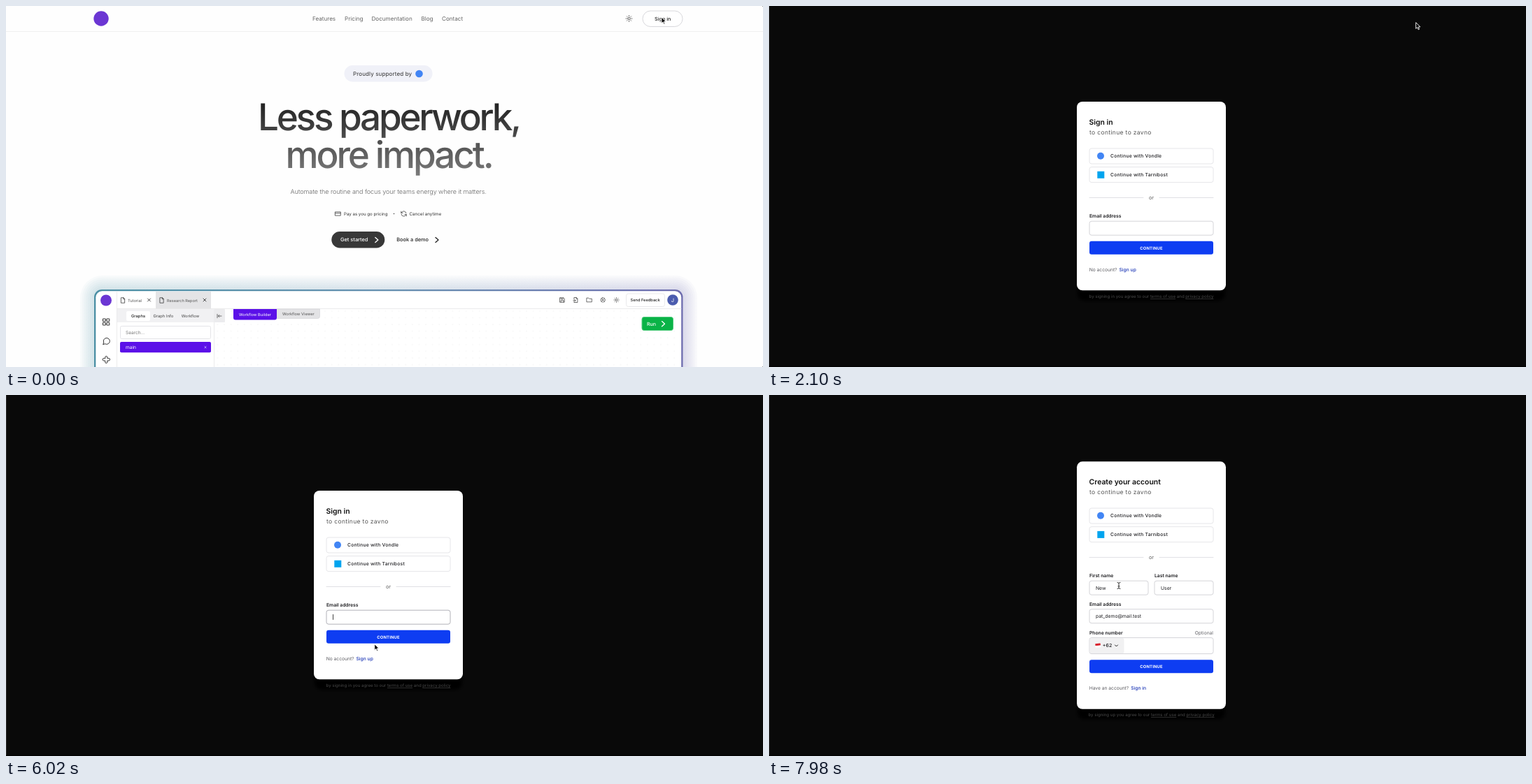
Animation, 1082 px wide and 517 px high, one loop 8 s. Source, as an HTML page:

```html
<!DOCTYPE html>
<html lang="en">
<head>
<meta charset="utf-8">
<title>Sign-in walkthrough</title>
<style>
  html, body { margin: 0; width: 100%; height: 100%; overflow: hidden; background: #fefefe; }
  svg { display: block; width: 100vw; height: 100vh; }
  text { font-family: Inter, Arial, sans-serif; text-rendering: geometricPrecision; white-space: pre; }
  .u { text-decoration: underline; }
  .m { font-weight: 500; }
  .b { font-weight: 600; }
  .x { font-weight: 700; }
  .c { text-anchor: middle; }
  .e { text-anchor: end; }
</style>
</head>
<body>
<svg id="stage" viewBox="0 0 1082 517" preserveAspectRatio="none"></svg>
<script>
const STEP = 70, LOOP = 8000;

// ---- drawing helpers
const text = (x, y, size, str, fill = '#222', cls = '', more = '') =>
  `<text x="${x}" y="${y}" font-size="${size}" fill="${fill}" class="${cls}" ${more}>${str}</text>`;
const rect = (x, y, w, h, fill, r = 0, stroke = 'none', more = '') =>
  `<rect x="${x}" y="${y}" width="${w}" height="${h}" rx="${r}" fill="${fill}" stroke="${stroke}" ${more}/>`;
const disc = (x, y, r, fill) => `<circle cx="${x}" cy="${y}" r="${r}" fill="${fill}"/>`;
const line = (d, stroke, width = 1) =>
  `<path d="${d}" fill="none" stroke="${stroke}" stroke-width="${width}" stroke-linecap="round" stroke-linejoin="round"/>`;
// icons live on a 24-unit grid centred on (x, y)
const icon = (x, y, size, d, stroke = '#333', width = 2) =>
  `<g transform="translate(${x} ${y}) scale(${size / 24}) translate(-12 -12)">${line(d, stroke, width)}</g>`;
const chevron = (x, y, color) => line(`M${x - 2} ${y - 3.6}l4 3.6l-4 3.6`, color, 1.3);
const cross = (x, y, r, color) =>
  line(`M${x - r} ${y - r}l${2 * r} ${2 * r}m0 ${-2 * r}l${-2 * r} ${2 * r}`, color, 0.8);

const SUN = 'M8 12a4 4 0 1 0 8 0a4 4 0 1 0-8 0M12 2v2M12 20v2M2 12h2M20 12h2M5 5l1.4 1.4M17.6 17.6L19 19M5 19l1.4-1.4M17.6 6.4L19 5';
const FILE = 'M14 2H5v20h14V7zM14 2v5h5';
const SAVE = 'M3 3h14l4 4v14H3zM7 3v5h8V3M7 21v-8h10v8';
const EXPORT = 'M5 9V2h9l5 5v15H5v-4M14 2v5h5M2 14h9M8 11l3 3l-3 3';
const FOLDER = 'M2 4h7l3 3h10v13H2z';
const GEAR = 'M12 2l3 3h4v4l3 3l-3 3v4h-4l-3 3l-3-3H5v-4l-3-3l3-3V5h4zM9 12a3 3 0 1 0 6 0a3 3 0 1 0-6 0';
const TILES = 'M3 3h7v7H3zM14 3h7v7h-7zM3 14h7v7H3zM14 14h7v7h-7z';
const CHAT = 'M3 21l2-5a9 9 0 1 1 4 4z';
const PUZZLE = 'M9 8V5a3 3 0 0 1 6 0v3h4a3 3 0 0 1 0 7h-4v4a3 3 0 0 1-6 0v-4H5a3 3 0 0 1 0-7z';
const PAYCARD = 'M2 5h20v14H2zM2 10h20';
const CYCLE = 'M21 10a9 9 0 0 0-16-4L2 9M2 3v6h6M3 14a9 9 0 0 0 16 4l3-3M22 21v-6h-6';
const COLLAPSE = 'M21 12H7M12 7l-5 5l5 5M3 4v16';

const PURPLE = '#6b36d3', VIVID = '#5b10e8', BLUE = '#0e3df2';

// ---- landing page
function glow() {
  let out = '';
  for (let i = 0; i < 7; i++) {
    const d = 20 - i * 2.8;
    out += rect(126 - d, 406 - d, 842 + 2 * d, 260, 'url(#edge)', 12 + d, 'none', 'opacity=".036"');
  }
  return out;
}

const preview = () => glow() +
  rect(126, 406, 841.5, 200, 'url(#edge)', 11) +
  rect(128.3, 408.3, 836.9, 200, '#fff', 9) +
  rect(298, 434, 667, 90, 'url(#dots)') +
  disc(143, 421.5, 8, PURPLE) +
  rect(214, 409, 79, 24.5, '#e4e4e6') +
  rect(159, 434, 154, 19, '#f1f1f3') + rect(297, 434, 16, 19, '#ececee', 2) +
  line('M158.500 409V517M297.500 453V517M159 433.500H965', '#e6e6e8', 0.8) +
  icon(167, 421.5, 9, FILE) + text(174, 423.7, 5.7, 'Tutorial', '#555') + cross(204.5, 421, 2, '#222') +
  icon(222.5, 421.5, 9, FILE) + text(230, 423.7, 5.6, 'Research Report', '#555') + cross(284, 421, 2, '#222') +
  [SAVE, EXPORT, FOLDER, GEAR, SUN].map((d, i) => icon(795 + i * 19.4, 421, 8.5, d)).join('') +
  rect(886.5, 412, 55, 18.5, '#fff', 3, '#e4e4e6', 'stroke-width=".8"') +
  text(892.5, 423.2, 5.7, 'Send Feedback', '#222', 'm') +
  disc(953, 421, 7.8, '#4b5cae') + text(953, 423.8, 7.5, 'J', '#fff', 'c') +
  rect(172, 437, 34, 14, '#fff', 2) + text(179, 446.1, 5.8, 'Graphs', '#222', 'm') +
  text(210.5, 446.1, 5.8, 'Graph Info', '#444') + text(250.7, 446.1, 5.7, 'Workflow', '#444') +
  icon(305, 444, 8, COLLAPSE) +
  rect(163.5, 458.5, 129, 18, '#fff', 2, '#dedee2', 'stroke-width=".8"') + text(171, 469.8, 6.5, 'Search...', '#777') +
  rect(163, 481, 130, 15.3, VIVID, 2) + text(171, 491, 6.6, 'main', '#fff') + cross(285, 488.7, 1.1, '#d9c9ff') +
  icon(143.3, 452.5, 12, TILES) + icon(143.3, 480, 12, CHAT) + icon(143.3, 506.5, 12, PUZZLE) +
  `<path d="M387.500 434h61v10.500a3 3 0 0 1-3 3h-58z" fill="#e3e3e5" stroke="#d2d2d5" stroke-width=".6"/>` +
  text(395, 442.8, 5.7, 'Workflow Viewer', '#555') +
  `<path d="M325 434h62v12.500a3 3 0 0 1-3 3h-56a3 3 0 0 1-3-3z" fill="${VIVID}"/>` +
  text(333, 444, 5.7, 'Workflow Builder', '#fff') +
  rect(909, 445.5, 44.5, 19, '#0ab347', 3, '#4fcb7c') + text(916, 457.6, 7.1, 'Run', '#fff', 'm') + chevron(939.5, 455.2, '#fff');

const home = () =>
  rect(0, 0, 1082, 517, '#fefefe') +
  line('M0 36.500H1082', '#ececec', 0.8) +
  disc(136, 18, 10.7, PURPLE) +
  [[438, 'Features'], [484, 'Pricing'], [522.5, 'Documentation'], [593.5, 'Blog'], [623, 'Contact']]
    .map(([x, s]) => text(x, 20.9, 8.1, s, '#666')).join('') +
  icon(890.5, 18, 10.5, SUN, '#444') +
  rect(910, 7, 57, 22.5, '#fff', 11.2, '#d8d8dc') + text(927, 20.7, 7.2, 'Sign in', '#222', 'm') +
  rect(483.5, 85, 126, 23.5, '#f0f1f8', 11.7) +
  text(496, 99.9, 8, 'Proudly supported by', '#333', '', 'letter-spacing=".14"') + disc(590.5, 97, 5.3, '#4285f4') +
  text(360, 177.7, 53, 'Less paperwork,', 'url(#ink)', 'm', 'letter-spacing="-3.25"') +
  text(399.5, 232.3, 53, 'more impact.', 'url(#ink)', 'm', 'letter-spacing="-3.1"') +
  text(406.5, 269.3, 9, 'Automate the routine and focus your teams energy where it matters.', '#666', '', 'font-weight="300" letter-spacing="-.06"') +
  icon(474.5, 297.5, 9, PAYCARD) + text(483, 299.8, 6.15, 'Pay as you go pricing', '#333') +
  disc(554.5, 297.5, 0.8, '#444') +
  icon(568.5, 297.5, 9, CYCLE) + text(576.5, 299.8, 6.25, 'Cancel anytime', '#333') +
  rect(465.3, 323, 76, 23.5, '#383838', 11.7) + text(478, 337.4, 7.4, 'Get started', '#fff', 'm') + chevron(529.8, 335, '#fff') +
  text(558.3, 337.4, 7.35, 'Book a demo', '#222', 'm') + chevron(616, 335, '#222') +
  preview();

// ---- sign-in and sign-up cards
const legal = (id, word) =>
  `<text id="${id}" x="546.5" class="c" font-size="6.12">by signing ${word} you agree to our <tspan class="u">terms of use</tspan> and <tspan class="u">privacy policy</tspan></text>`;
const field = (x, y, w, h = 20, id = '') =>
  rect(x, y, w, h, '#fff', 3, '#d0d0d4', `stroke-width=".9" id="${id}"`);
const label = (x, y, s) => text(x, y, 6.75, s, '#1d1d20', 'b');
const value = (x, y, s) => text(x, y, 6.8, s, '#1d1d20');
const provider = (y, name, mark, id) =>
  rect(458, y, 177, 22, '#fff', 3, '#e4e4e7', 'stroke-width=".9"') +
  `<g id="${id}" opacity="0">${rect(458.5, y + 0.5, 176, 21, '#f6f6f7', 3)}${line(`M614.500 ${y + 11}h7.500m-3-3l3 3l-3 3`, '#777', 0.9)}</g>` +
  mark + text(488, y + 13.4, 6.8, 'Continue with ' + name, '#1d1d20', 'm', 'letter-spacing=".2"');
const shell = (y, h) =>
  rect(441, y + 8, 211, h + 7, '#000', 10, 'none', 'filter="url(#soft)"') + rect(440, y, 213, h, '#fff', 8);
const heading = (title, dy, tag) => `<g transform="translate(0 ${dy})">` +
  text(457.6, 169.7, 10.4, title, '#111', 'b') +
  text(458, 184, 8.5, 'to continue to zavno', '#555', '', 'letter-spacing=".35"') +
  provider(204, 'Vondle', disc(474, 214.7, 5, '#4285f4'), tag + 'A') +
  provider(230.6, 'Tarnibost', rect(469.3, 236.8, 10, 10, '#00a4ef'), tag + 'B') +
  line('M458 274.500H535M558 274.500H635', '#d9d9dd', 0.8) +
  text(546.5, 276.8, 7.1, 'or', '#555', 'c') + '</g>';
const submit = y => rect(458, y, 177, 19, BLUE, 3) +
  text(546.5, y + 11.7, 5.9, 'CONTINUE', '#fff', 'x c', 'letter-spacing=".13"');
const footer = (y, ask, x, link) =>
  text(457.7, y, 6.7, ask, '#5c5c61') + text(x, y, 6.75, link, '#1a35b5', 'm');

const signIn = () => shell(137, 270.3) + heading('Sign in', 0, 'in') +
  label(458, 303.2, 'Email address') + field(458, 308.2, 177, 20, 'email') +
  `<g id="caret">${line('M467.500 314.500V321.500', '#111', 0.8)}</g>` +
  submit(336.8) + footer(379.6, 'No account?', 500.5, 'Sign up');

const signUp = () => shell(95.3, 354.5) + heading('Create your account', -41.9, 'up') +
  label(458, 261.3, 'First name') + label(551, 261.3, 'Last name') +
  field(458, 266.2, 84) + value(467, 278.5, 'New') + field(551, 266.2, 84) + value(560, 278.5, 'User') +
  label(458, 301.8, 'Email address') + field(458, 306.8, 177) + value(467, 319.2, 'pat_demo@mail.test') +
  label(458, 342.5, 'Phone number') + text(635, 342.5, 6.7, 'Optional', '#66666b', 'e') +
  field(458, 347.6, 177, 23) + rect(458.5, 348.1, 49, 22, '#f1f1f2', 2.5) +
  `<g transform="rotate(-6 470 359)">${rect(466.5, 355.8, 7.5, 3.2, '#d8232e', 0.5)}${rect(466.5, 359, 7.5, 2.8, '#fff')}</g>` +
  text(476.8, 361.4, 7, '+62', '#1d1d20', 'm') + line('M494.500 358l2 2l2-2', '#222', 1) +
  submit(379.2) + footer(422.1, 'Have an account?', 517.2, 'Sign in');

// ---- pointers, each with its hot spot at the origin
const pointers = {
  arrow: '<path d="M0 0V8.800L2.100 6.900L3.500 10.200L4.900 9.600L3.500 6.300H6.200Z" fill="#000" stroke="#fff" stroke-width=".9" stroke-linejoin="round"/>',
  hand: `<path d="M-1 1a.9.9 0 0 1 1.800 0V4L4 4.600a1.500 1.500 0 0 1 1 1.600L4.400 10H-.3L-3 6.500q.2-1.300 2 0z" fill="#fff" stroke="#222" stroke-width=".9" stroke-linejoin="round"/>` +
    line('M.8 6v2M2.200 6v2M3.500 6v2', '#333', 0.5),
  beam: line('M-2-4.500Q0-4.500 0-3.300Q0-4.500 2-4.500M0-3.300V3.300M-2 4.500Q0 4.500 0 3.300Q0 4.500 2 4.500M-1 .9H1', '#222', 0.9)
};

const group = (id, body) => `<g id="${id}">${body}</g>`;
document.getElementById('stage').innerHTML = `<defs>
  <linearGradient id="edge" gradientUnits="userSpaceOnUse" x1="126" y1="460" x2="968" y2="460">
    <stop offset="0" stop-color="#4a8fa4"/><stop offset=".5" stop-color="#6690b0"/><stop offset="1" stop-color="#6d6cae"/>
  </linearGradient>
  <linearGradient id="ink" gradientUnits="userSpaceOnUse" x1="0" y1="135" x2="0" y2="245">
    <stop offset="0" stop-color="#1e1e1e"/><stop offset="1" stop-color="#7c7c7c"/>
  </linearGradient>
  <pattern id="dots" width="9.600" height="9.600" patternUnits="userSpaceOnUse">${disc(4.8, 4.8, 0.5, '#dcdce0')}</pattern>
  <filter id="soft" x="-10%" y="-10%" width="120%" height="120%"><feGaussianBlur stdDeviation="2.500"/></filter>
</defs>` +
  rect(0, 0, 1082, 517, '#fefefe') +
  group('home', home()) +
  rect(1081, 0, 1, 1, '#999') + rect(1081, 516, 1, 1, '#999') +
  group('dark', rect(0, 0, 1082, 517, '#090909') + rect(0, 0, 1, 517, '#2b2b2b') + rect(0, 515.5, 1082, 1.5, '#040404')) +
  group('signIn', signIn()) + group('signUp', signUp()) +
  legal('legalIn', 'in') + legal('legalUp', 'up') +
  group('pointer', Object.entries(pointers).map(([id, body]) => group(id, body)).join(''));

// ---- motion
const $ = id => document.getElementById(id);
const clamp = v => Math.max(0, Math.min(1, v));
const ease = v => v * v * (3 - 2 * v);
const show = (id, on) => $(id).setAttribute('opacity', +on);
const between = (t, from, to) => t >= from && t < to;

// start time, number of steps, destination
const moves = [
  [70, 12, 931, 20], [2100, 12, 607, 204], [2940, 1, 606, 204], [3290, 5, 606, 211],
  [3920, 6, 606, 237], [4480, 8, 549, 312], [5040, 4, 546, 317],
  [5740, 9, 513, 385], [6370, 3, 515, 377], [7280, 11, 500, 273]
];
function pointerAt(t) {
  let x = 937, y = 16;
  for (const [start, steps, toX, toY] of moves) {
    if (t < start) break;
    const k = ease(clamp(((t - start) / STEP + 1) / steps));
    x += (toX - x) * k;
    y += (toY - y) * k;
  }
  return [x, y];
}

// top, bottom, pointer
const zonesIn = [[203, 226, 'hand'], [230, 253, 'hand'], [308, 329, 'beam'], [337, 356, 'hand'], [373, 390, 'hand']];
const zonesUp = [[266, 287, 'beam'], [307, 327, 'beam'], [348, 371, 'beam'], [379, 398, 'hand']];
function pointerKind(t, x, y) {
  if (t < 3290) return 'arrow';
  const hit = (t < 6580 ? zonesIn : zonesUp).find(([top, bottom]) => y >= top && y <= bottom);
  if (!hit) return 'arrow';
  return t > 6580 && hit[0] === 348 && x < 507 ? 'hand' : hit[2];
}

function render(ms) {
  const t = Math.floor(ms / STEP) * STEP;
  show('home', t < 910);
  show('dark', t >= 1120);
  $('edge').setAttribute('gradientTransform', `rotate(${Math.min(t, 840) * 0.03} 547 460)`);

  const inCard = between(t, 1680, 6580), upCard = t >= 6720;
  show('signIn', inCard && (t < 1750 ? 0.35 : t < 1820 ? 0.8 : 1));
  show('signUp', upCard && (t < 6790 ? 0.6 : 1));

  const grey = t < 1120 ? '#aaa' : inCard || upCard ? '#484848' : '#5a5a5a';
  const place = (id, on, y) => { show(id, on); $(id).setAttribute('y', y); $(id).setAttribute('fill', grey); };
  place('legalIn', between(t, 980, 6650), inCard ? 418.3 : 281);
  place('legalUp', t >= 6650, upCard ? 460.4 : 283.2);

  const swap = clamp((t - 3920) / 350);
  show('inA', clamp((t - 3290) / 280) * (1 - swap));
  show('inB', swap * (1 - clamp((t - 4410) / 280)));
  $('email').setAttribute('stroke', between(t, 5180, 6510) ? '#a9a9b0' : '#d0d0d4');
  show('caret', between(t, 5600, 6090));

  const [x, y] = pointerAt(t), kind = pointerKind(t, x, y);
  $('pointer').setAttribute('transform', `translate(${x} ${y})`);
  for (const id in pointers) show(id, id === kind);
}

const began = performance.now();
function tick(now) {
  render(Math.max(0, now - began) % LOOP);
  requestAnimationFrame(tick);
}
render(0);
requestAnimationFrame(tick);
</script>
</body>
</html>
```
